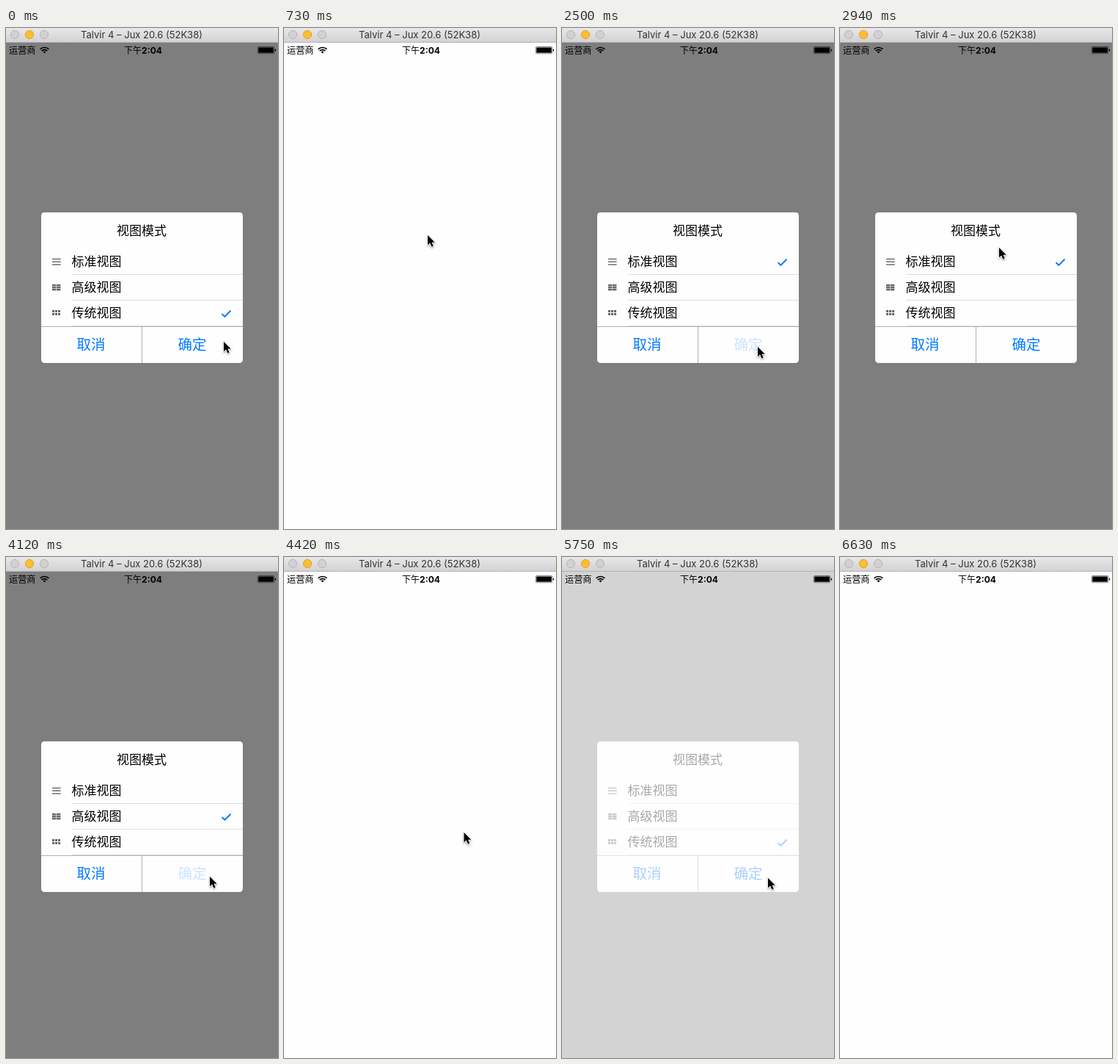
These frames come from a looping animation (371 by 682 pixels, 6780 ms). An HTML page:

```html
<!DOCTYPE html>
<html lang="zh-CN">
<head>
<meta charset="utf-8">
<style>
  html, body { margin: 0; width: 100%; height: 100%; overflow: hidden; background: #fefefe; }
  svg { display: block; width: 371px; height: 682px; }
  text { font-family: Inter, "Noto Sans CJK SC", "Noto Sans CJK", sans-serif; }
  .cjk { font-family: "Noto Sans CJK SC", "Noto Sans CJK", sans-serif; }
  .mid { text-anchor: middle; }
  .label { font-size: 17px; }
  .button { font-size: 19.5px; fill: #007aff; }
  #cursor { filter: drop-shadow(0 1px 1px rgba(0, 0, 0, .4)); }
</style>
</head>
<body>
<svg viewBox="0 0 371 682">
  <defs>
    <linearGradient id="bar" x2="0" y2="1">
      <stop stop-color="#e9e7e9"/><stop offset="1" stop-color="#d2d0d2"/>
    </linearGradient>
  </defs>
  <rect width="371" height="682" fill="#fefefe"/>

  <!-- Status bar -->
  <text class="cjk" x="4" y="34.7" font-size="12.2">运营商</text>
  <g fill="none" stroke="#000" stroke-width="1.7">
    <path d="M46.6 28.9a8.4 8.4 0 0 1 11.8 0M48.7 31.1a5.4 5.4 0 0 1 7.6 0"/>
    <path d="M50.5 32.4a3 3 0 0 1 4 0L52.5 34.5z" fill="#000" stroke="none"/>
  </g>
  <text class="mid" x="187" y="34.6" font-size="12"><tspan class="cjk" font-weight="500">下午</tspan><tspan font-weight="700">2:04</tspan></text>
  <rect x="343.3" y="25.5" width="22.6" height="9.3" rx="1.5" fill="none" stroke="#555" stroke-width=".7"/>
  <rect x="344.3" y="26.5" width="20.6" height="7.3" rx=".6"/>
  <path d="M366.8 28.5q1.4 .4 1.4 1.7t-1.4 1.7z"/>

  <!-- Dimmed dialog -->
  <g id="modal">
    <rect y="20" width="371" height="662" opacity=".5"/>
    <rect x="48" y="251" width="275" height="205" rx="4.5" fill="#fefefe"/>
    <text class="cjk mid label" x="185" y="282">视图模式</text>
    <g id="rows"></g>
    <path d="M48 406.5H323M185.5 407V456" stroke="#b2b2b2"/>
    <path id="check" d="M294.6 319.3l3.8 3.6 8.1-8.2" fill="none" stroke="#007aff" stroke-width="2"/>
    <text class="cjk mid button" x="116" y="438.4">取消</text>
    <text class="cjk mid button" x="254" y="438.4" id="ok">确定</text>
  </g>

  <!-- Window title bar -->
  <rect width="371" height="20" fill="url(#bar)"/>
  <path d="M0 19.5H371" stroke="#b4b2b4"/>
  <g fill="#d2d1d2" stroke="#b7b5b7">
    <circle cx="12" cy="9" r="5.6"/>
    <circle cx="32" cy="9" r="5.6" fill="#fdbe2f" stroke="#e0a02c"/>
    <circle cx="52" cy="9" r="5.6"/>
  </g>
  <text class="mid" x="185" y="14" font-size="13" fill="#333">Talvir 4 – Jux 20.6 (52K38)</text>

  <path id="cursor" d="M0 0V13.4L3.1 10.6 5.4 15.8 7.7 14.8 5.5 9.7H9.7z" stroke="#fff" stroke-width="1.6" paint-order="stroke"/>
</svg>
<script>
const $ = id => document.getElementById(id);
const LOOP = 6780, STEPS = 46, ROW = 35;

const box = (x, y, w, h) => `<rect x="${x}" y="${y}" width="${w}" height="${h}" fill="#666"/>`;
const grid = (xs, ys, w, h) => ys.map(y => xs.map(x => box(x, y, w, h)).join("")).join("");
const icons = [
  grid([63], [313.8, 317.6, 321.4], 11.6, 1.4),
  grid([63, 69], [314, 317, 320], 5.4, 2.4),
  grid([63, 67, 71], [314, 318], 3, 3)
];
$("rows").innerHTML = ["标准视图", "高级视图", "传统视图"].map((name, i) =>
  `<g transform="translate(0 ${i * ROW})">${icons[i]}
  <text class="cjk label" x="89.5" y="324.2">${name}</text>
  <path d="M90 335.5H323" stroke="#dedede"/></g>`).join("");

// Keys are [step, ...values]
const path = [
  [0, 297, 427], [1, 295, 431], [2, 285, 415], [5, 196, 282], [6, 196, 282],
  [8, 288, 316], [10, 317, 317], [11, 316, 320], [16, 267, 434], [17, 267, 434],
  [18, 262, 420], [20, 217, 299], [21, 217, 301], [24, 262, 352], [26, 262, 352],
  [28, 278, 435], [29, 275, 428], [31, 216, 322], [32, 214, 319], [34, 272, 389],
  [35, 275, 424], [36, 275, 424], [37, 281, 437], [41, 281, 437], [44, 334, 664], [45, 360, 720]
];
const fade = [
  [0, 1], [1, 1], [3, 0], [5, 0], [7, 1], [17, 1], [18, .5], [19, .4], [20, 1],
  [28, 1], [30, 0], [32, 1], [37, 1], [40, 0], [45, 0]
];
const picks = [[0, 2], [11, 0], [25, 1], [34, 2]];
const presses = [1, 17, 28, 37];

function lerp(keys, n) {
  const i = Math.max(1, keys.findIndex(k => k[0] >= n));
  const a = keys[i - 1], b = keys[i], p = (n - a[0]) / (b[0] - a[0]);
  return a.slice(1).map((v, j) => v + (b[j + 1] - v) * p);
}

function draw() {
  const t = performance.now() % LOOP;
  const n = Math.min(STEPS - 1, Math.floor((t + 10) * STEPS / LOOP));
  const [x, y] = lerp(path, n);
  const row = picks.filter(k => k[0] <= n).pop()[1];
  $("cursor").setAttribute("transform", `translate(${x} ${y})`);
  $("modal").setAttribute("opacity", lerp(fade, n)[0]);
  $("check").setAttribute("transform", `translate(0 ${row * ROW})`);
  $("ok").setAttribute("opacity", presses.includes(n) ? .2 : 1);
  requestAnimationFrame(draw);
}
draw();
</script>
</body>
</html>
```
